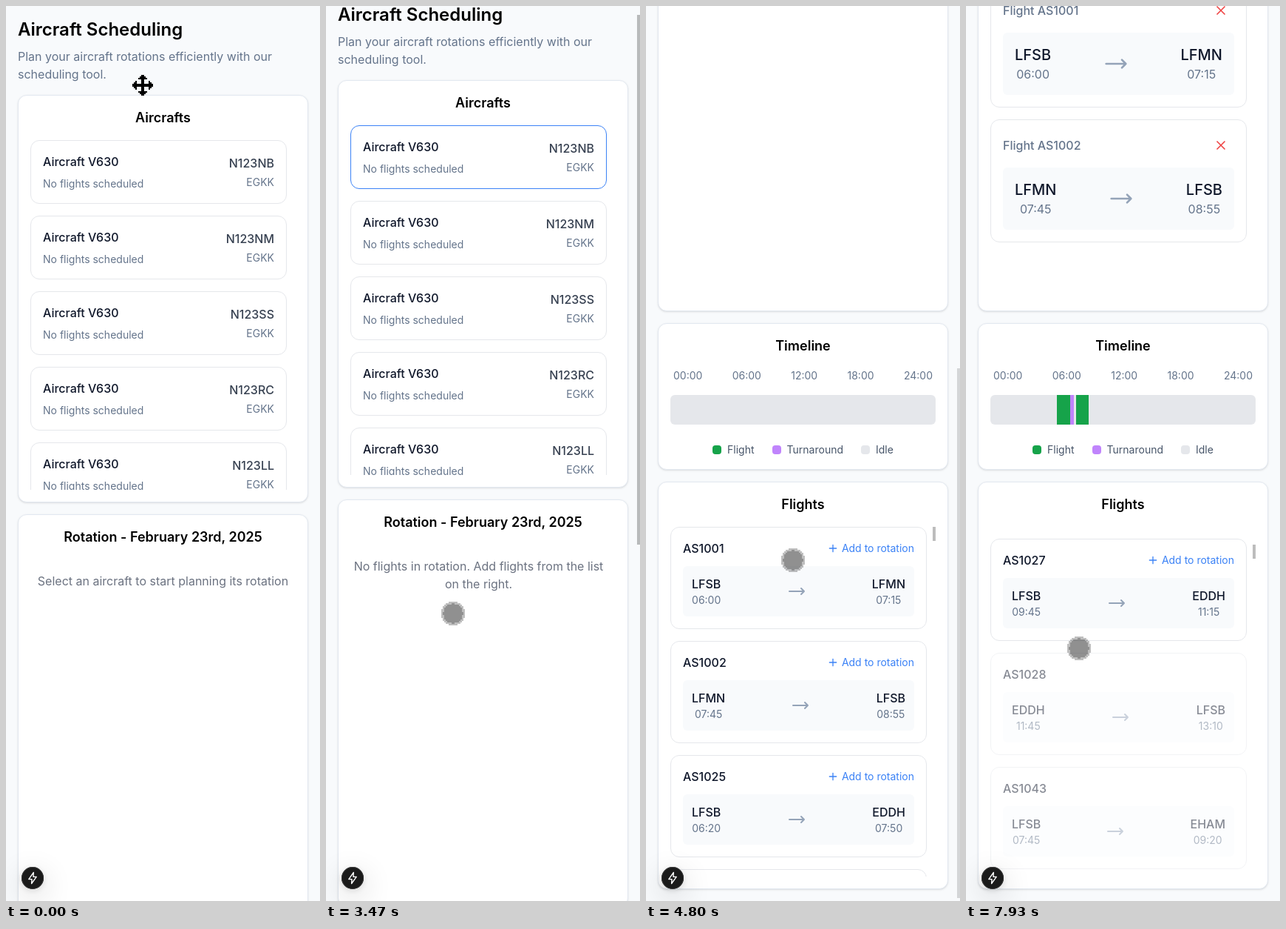
Write an HTML page with a canvas that moves like this. It is 425 by 1208 pixels and loops after 8 s.

```html
<!DOCTYPE html>
<html lang="en">
<head>
<meta charset="utf-8">
<title>Aircraft Scheduling</title>
<style>
* { box-sizing: border-box; margin: 0; }
html, body { width: 425px; height: 1208px; overflow: hidden; background: #f8fafc; }
body { position: relative; font: 16px/24px Inter, sans-serif; font-optical-sizing: none; color: #0f172a; }
h1 { font-size: 24px; line-height: 32px; font-weight: 600; color: #000; margin-bottom: 8px; }
h2 { font-size: 18px; line-height: 28px; font-weight: 600; color: #000; text-align: center; margin-bottom: 16px; }
svg { display: block; fill: none; stroke: currentColor; stroke-width: 2; stroke-linecap: round; stroke-linejoin: round; }
.page { position: absolute; inset: 0 0 auto; height: 2032px; padding: 16px; color: #64748b; }
.panel { position: relative; height: 550px; margin-top: 16px; padding: 16px; background: #fff; border: 1px solid #e2e8f0;
  border-radius: 12px; box-shadow: 0 1px 3px rgba(0,0,0,.1), 0 1px 2px -1px rgba(0,0,0,.1); }
.panel.short { height: 198px; }
.list { position: relative; height: 472px; overflow: hidden; padding-right: 12px; }
.card { position: relative; padding: 16px; margin-bottom: 16px; border: 1px solid #e5e7eb; border-radius: 12px; background: #fff; }
.row { display: flex; justify-content: space-between; align-items: center; }
.small { font-size: 14px; line-height: 20px; }
.dark { color: #0f172a; font-weight: 500; }
.plane .small { margin-top: 8px; }
.plane .tail { text-align: right; }
.tail b { display: block; font-weight: 500; color: #374151; }
.tail .small { margin-top: 4px; }
.note { position: absolute; top: 77px; left: 16px; width: 359px; text-align: center; color: #6b7280; }
.note.narrow { width: 347px; }
.leg { margin-top: 12px; padding: 12px; border-radius: 6px; background: #f8fafc; text-align: center; }
.leg svg { color: #94a3b8; }
.add { display: flex; align-items: center; gap: 4px; color: #3b82f6; }
.plan { position: absolute; top: 108px; left: 16px; width: 347px; }
.plan .head { height: 36px; font-weight: 500; }
.plan .head svg { margin-right: 8px; color: #ef4444; }
.plan .leg { padding: 16px; }
.plan .leg .dark { font-size: 20px; line-height: 28px; }
.plan .leg .small { font-size: 16px; line-height: 24px; }
.bar { position: relative; height: 40px; margin: 16px 0 24px; border-radius: 6px; background: #e5e7eb; overflow: hidden; }
.bar i { position: absolute; top: 0; height: 100%; }
.hours { padding: 0 4px; }
.legend { display: flex; justify-content: center; gap: 24px; color: #475569; }
.legend span { display: flex; align-items: center; gap: 8px; }
.legend i { width: 12px; height: 12px; border-radius: 4px; }
.thumb { position: absolute; right: 0; top: 0; width: 4px; height: 19px; background: #bdbdbd; }
.pagebar { height: 715px; background: rgba(0,0,0,.26); }
.badge { position: absolute; left: 21px; top: 1162px; width: 30px; height: 30px; border-radius: 50%; background: #1a1a1a; color: #fff;
  box-shadow: inset 0 0 0 1px #363636, 0 11px 40px rgba(0,0,0,.2), 0 2px 10px rgba(0,0,0,.12); }
.touch { position: absolute; left: -16px; top: -16px; width: 32px; height: 32px; image-rendering: pixelated; }
.mover { position: absolute; left: 171px; top: 93px; fill: #000; stroke: none; }

/* 8 s cycle: 1% = 80 ms; movement advances about 15 times a second */
.page, .pagebar, .reel, .reelbar, .touch { animation: 8s linear infinite; }
.page { animation-name: scroll; }
.pagebar { animation-name: slide, fade; }
.reel { animation-name: reel; }
.reelbar { animation-name: reelbar; }
.touch { animation-name: touch; }
.step { animation: 8s step-end infinite; }
.select { animation-name: select; }
.hide0 { animation-name: hide0; }
.hide1 { animation-name: hide1; }
.show1 { animation-name: show1; }
.hide2 { animation-name: hide2; }
.show2 { animation-name: show2; }
.hide3 { animation-name: hide3; }
.show3 { animation-name: show3; }
.dim2 { animation-name: dim2; }
.dim3 { animation-name: dim3; }
@keyframes hide0 { 0% { opacity: 1 } 7.5%, 100% { opacity: 0 } }
@keyframes hide1 { 0% { opacity: 1 } 30.875%, 100% { opacity: 0 } }
@keyframes show1 { 0% { opacity: 0 } 30.875%, 100% { opacity: 1 } }
@keyframes hide2 { 0% { opacity: 1 } 64.125%, 100% { opacity: 0 } }
@keyframes show2 { 0% { opacity: 0 } 64.125%, 100% { opacity: 1 } }
@keyframes hide3 { 0% { opacity: 1 } 81.625%, 100% { opacity: 0 } }
@keyframes show3 { 0% { opacity: 0 } 81.625%, 100% { opacity: 1 } }
@keyframes dim2 { 0% { opacity: 1 } 64.125%, 100% { opacity: .5 } }
@keyframes dim3 { 0% { opacity: 1 } 81.625%, 100% { opacity: .5 } }
@keyframes select { 0% { border-color: #e5e7eb } 30.875%, 100% { border-color: #3b82f6 } }
@keyframes scroll {
  0%, 41.6% { transform: none; animation-timing-function: steps(2) }
  43.3% { transform: translateY(-20px); animation-timing-function: steps(8) }
  49.9% { transform: translateY(-449px); animation-timing-function: steps(6) }
  55%, 100% { transform: translateY(-824px) }
}
@keyframes slide {
  0%, 41.6% { transform: none; animation-timing-function: steps(2) }
  43.3% { transform: translateY(12px); animation-timing-function: steps(8) }
  49.9% { transform: translateY(266px); animation-timing-function: steps(6) }
  55%, 100% { transform: translateY(489px) }
}
@keyframes fade { 0%, 41.2% { opacity: 0 } 41.25%, 58.75% { opacity: 1 } 61.625%, 100% { opacity: 0 } }
@keyframes reel {
  0%, 93.5% { transform: none; animation-timing-function: steps(7) }
  99%, 100% { transform: translateY(-600px) }
}
@keyframes reelbar {
  0%, 93.5% { transform: none; animation-timing-function: steps(7) }
  99%, 100% { transform: translateY(24px) }
}
@keyframes touch {
  0%, 7.49% { transform: translate(183px,111px); opacity: 0 }
  7.5% { transform: translate(183px,111px); opacity: 1; animation-timing-function: steps(7) }
  13.3%, 15.875% { transform: translate(160px,166px); animation-timing-function: steps(8) }
  22.5%, 25% { transform: translate(150px,255px) }
  25.8% { transform: translate(150px,246px) }
  31.75% { transform: translate(150px,246px); animation-timing-function: ease-in-out }
  40.875% { transform: translate(170px,806px) }
  42% { transform: translate(172px,836px) }
  43.3% { transform: translate(172px,820px); animation-timing-function: steps(8) }
  49.9% { transform: translate(158px,635px); animation-timing-function: steps(12) }
  59.9%, 60.8% { transform: translate(199px,748px) }
  61.625%, 65.5% { transform: translate(199px,750px); animation-timing-function: steps(10) }
  74.125% { transform: translate(177px,832px); animation-timing-function: steps(6) }
  79.125%, 81.625% { transform: translate(158px,916px) }
  87.4%, 90.8% { transform: translate(156px,913px); animation-timing-function: steps(3) }
  93.5% { transform: translate(155px,1166px); animation-timing-function: steps(7) }
  99%, 100% { transform: translate(153px,867px); opacity: 1 }
}
</style>
</head>
<body>
<main class="page">
  <h1>Aircraft Scheduling</h1>
  <p>Plan your aircraft rotations efficiently with our scheduling tool.</p>
  <section class="panel"><h2>Aircrafts</h2><div class="list" id="planes"></div></section>
  <section class="panel">
    <h2>Rotation - February 23rd, 2025</h2>
    <p class="note step hide1">Select an aircraft to start planning its rotation</p>
    <div class="step hide2"><p class="note narrow step show1">No flights in rotation. Add flights from the list on the right.</p></div>
    <div class="plan" id="plan"></div>
  </section>
  <section class="panel short">
    <h2>Timeline</h2>
    <div class="hours row small"><span>00:00</span><span>06:00</span><span>12:00</span><span>18:00</span><span>24:00</span></div>
    <div class="bar" id="bar"></div>
    <div class="legend small">
      <span><i style="background:#16a34a"></i>Flight</span>
      <span><i style="background:#c084fc"></i>Turnaround</span>
      <span><i style="background:#e5e7eb"></i>Idle</span>
    </div>
  </section>
  <section class="panel">
    <h2>Flights</h2>
    <div class="list"><div class="reel" id="flights"></div><div class="thumb reelbar"></div></div>
  </section>
</main>
<div class="thumb pagebar"></div>
<div class="badge"><svg width="30" height="30" style="stroke-width:1.4"><path d="M16.3 7.5 9.8 16.6H14L13.6 22.5 20.2 13.4H16Z"/></svg></div>
<svg class="mover step hide0" width="28" height="28" viewBox="-14 -14 28 28" shape-rendering="crispEdges">
  <path id="head" d="M-2 0V-8H-6V-10H-4V-12H-2V-14H2V-12H4V-10H6V-8H2V0Z"/>
  <use href="#head" transform="rotate(90)"/><use href="#head" transform="rotate(180)"/><use href="#head" transform="rotate(270)"/>
  <path d="M-2-2H2V2H-2Z"/>
</svg>
<canvas class="touch" width="16" height="16"></canvas>
<script>
const $ = s => document.querySelector(s);
const icon = (size, d) => `<svg width="${size}" height="${size}" viewBox="0 0 24 24"><path d="${d}"/></svg>`;
const arrow = size => icon(size, 'M18 8 22 12 18 16M2 12H22');
const stop = (code, time) => `<div><div class="dark">${code}</div><div class="small">${time}</div></div>`;
const leg = (f, size) => `<div class="leg row">${stop(f.from, f.out)}${arrow(size)}${stop(f.to, f.in)}</div>`;

// stage: the step at which a flight stops being available
const flights = [
  ['AS1001', 'LFSB', '06:00', 'LFMN', '07:15', 2],
  ['AS1002', 'LFMN', '07:45', 'LFSB', '08:55', 3],
  ['AS1025', 'LFSB', '06:20', 'EDDH', '07:50', 2],
  ['AS1026', 'EDDH', '08:20', 'LFSB', '09:45', 2],
  ['AS1027', 'LFSB', '09:45', 'EDDH', '11:15', 0],
  ['AS1028', 'EDDH', '11:45', 'LFSB', '13:10', 2],
  ['AS1043', 'LFSB', '07:45', 'EHAM', '09:20', 2],
].map(([id, from, out, to, end, stage]) => ({ id, from, out, to, in: end, stage }));

$('#planes').innerHTML = ['NB', 'NM', 'SS', 'RC', 'LL'].map((tail, i) => `
  <div class="card plane row ${i ? '' : 'step select'}">
    <div><div class="dark">Aircraft V630</div><div class="small">No flights scheduled</div></div>
    <div class="tail"><b>N123${tail}</b><div class="small">EGKK</div></div>
  </div>`).join('');

const until = (kind, stage) => stage ? `step ${kind}${stage}` : '';
$('#flights').innerHTML = flights.map(f => `
  <div class="card ${until('dim', f.stage)}">
    <div class="row"><span class="dark">${f.id}</span>
      <span class="add small ${until('hide', f.stage)}">${icon(16, 'M5 12H19M12 5V19')}Add to rotation</span></div>
    ${leg(f, 24)}
  </div>`).join('');

const chosen = flights.slice(0, 2);
$('#plan').innerHTML = chosen.map(f => `
  <div class="card step show${f.stage}">
    <div class="head row"><span>Flight ${f.id}</span>${icon(20, 'M18 6 6 18M6 6 18 18')}</div>
    ${leg(f, 32)}
  </div>`).join('');

const minutes = t => t.slice(0, 2) * 60 + +t.slice(3);
const block = (start, end, color, stage) =>
  `<i class="step show${stage}" style="left:${start / 14.4}%;width:${(end - start) / 14.4}%;background:${color}"></i>`;
const landed = minutes(chosen[0].in);
$('#bar').innerHTML = chosen.map(f => block(minutes(f.out), minutes(f.in), '#16a34a', f.stage)).join('')
  + block(landed, landed + 20, '#c084fc', 3);

const ctx = $('.touch').getContext('2d');
for (let i = 0; i < 256; i++) {
  const x = i % 16, y = i >> 4, d = Math.hypot(x - 7.5, y - 7.5);
  if (d > 8.1) continue;
  ctx.fillStyle = d < 6.6 ? 'rgba(34,34,34,.5)' : 'rgba(0,0,0,.25)';
  ctx.fillRect(x, y, 1, 1);
}
</script>
</body>
</html>
```
